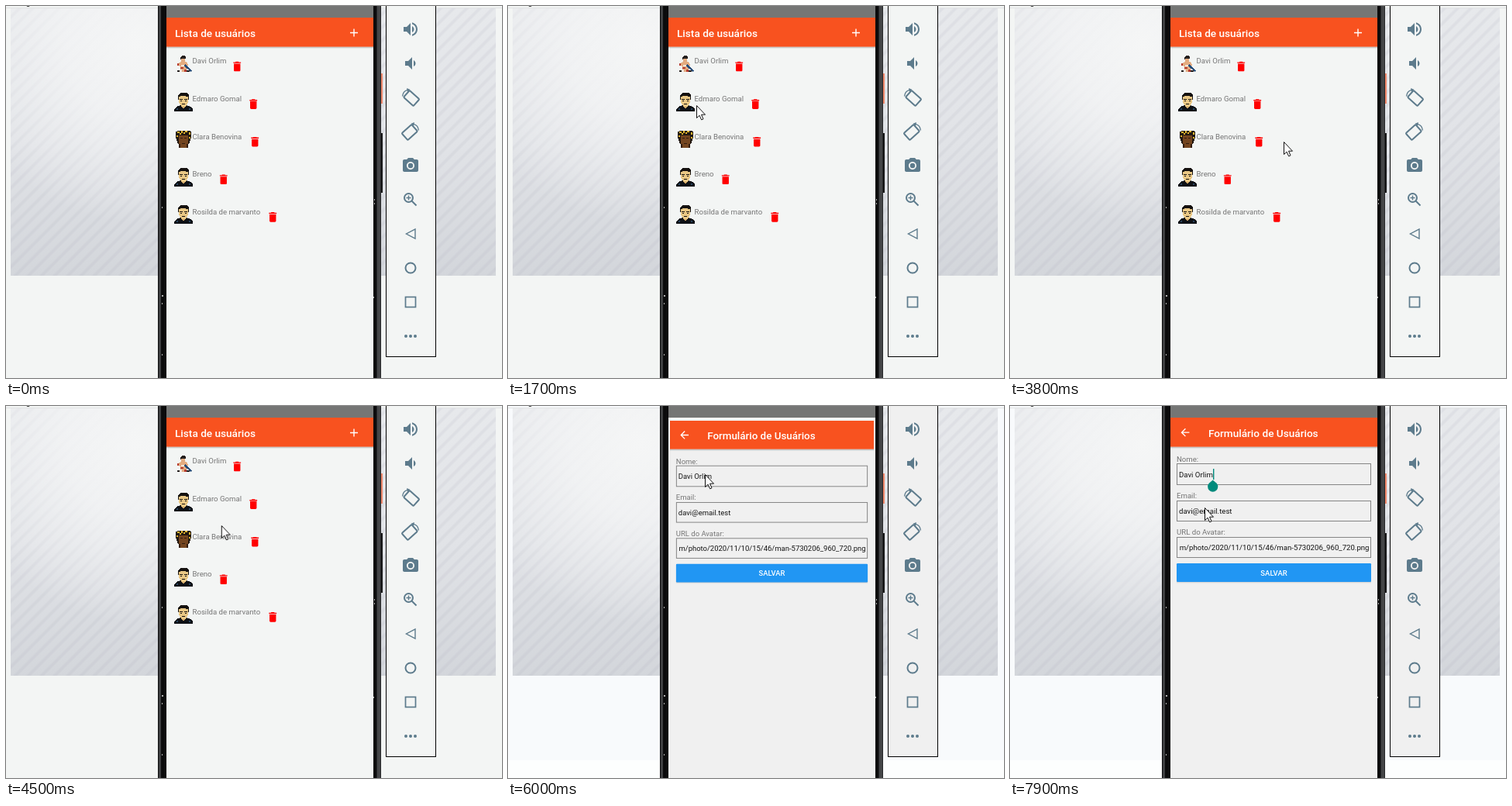
An HTML page for the animation above (8 s loop, 640 by 480 pixels).

```html
<!DOCTYPE html>
<html lang="pt-BR">
<head>
<meta charset="utf-8">
<title>Lista de usuários</title>
<style>
html, body { margin: 0; width: 100%; height: 100%; overflow: hidden; background: #f3f5f4; }
svg { display: block; }
text { font: 9.62px Roboto, sans-serif; }
.title { font-size: 13.6px; font-weight: 500; fill: #fff; }
.button { font-size: 9.5px; font-weight: 500; fill: #fff; text-anchor: middle; }
.label { fill: #757575; }
.input { fill: #141414; }
.url { text-anchor: end; }
.field { fill: none; stroke: #858585; }
.bar { fill: #f8521f; }
.icon { fill: #5d7b8c; }
.line { fill: none; stroke: #5d7b8c; stroke-width: 2; }
.thin { stroke-width: 1.4; }
.pixel { shape-rendering: crispEdges; }

.page, .foot, .tools, .list, .form, .caret, .cursor { animation: 8s step-end infinite; }
.page { animation-name: page; }
.foot { animation-name: foot; }
.tools { animation-name: tools; stroke: #000; }
.list { animation-name: list; }
.form { animation-name: form; transform-origin: 340.5px 255px; }
.caret { animation-name: caret; fill: #008a7c; }
.cursor { animation-name: cursor; }

@keyframes page { 0% { fill: #f3f5f4; } 73.75%, 100% { fill: #f8fafc; } }
@keyframes foot { 0% { fill: #f3f5f4; } 73.75%, 100% { fill: #fdfefe; } }
@keyframes tools { 0% { fill: #f3f5f4; } 73.75%, 100% { fill: #f0f0f0; } }
@keyframes list { 0% { visibility: visible; } 75%, 100% { visibility: hidden; } }
@keyframes form {
  0% { visibility: hidden; opacity: 0; transform: scale(.93); }
  73.75% { visibility: visible; opacity: .6; transform: scale(.94); }
  75% { visibility: visible; opacity: 1; transform: scale(.985); }
  77.5%, 100% { visibility: visible; opacity: 1; transform: none; }
}
@keyframes caret { 0% { visibility: hidden; } 92.5%, 100% { visibility: visible; } }

/* one step per 100 ms */
@keyframes cursor {
  0% { transform: translate(205px, -24px); animation-timing-function: steps(9); }
  11.25% { transform: translate(230px, 68px); }
  13.75% { transform: translate(230px, 68px); animation-timing-function: steps(2); }
  16.25% { transform: translate(241px, 176px); }
  17.5% { transform: translate(241px, 176px); animation-timing-function: steps(3); }
  21.25% { transform: translate(243px, 128px); animation-timing-function: steps(6); }
  28.75% { transform: translate(362px, 316px); animation-timing-function: steps(2); }
  31.25% { transform: translate(390px, 317px); }
  32.5% { transform: translate(390px, 317px); animation-timing-function: steps(4); }
  37.5% { transform: translate(410px, 270px); animation-timing-function: steps(5); }
  43.75% { transform: translate(364px, 181px); }
  45% { transform: translate(360px, 178px); }
  47.5% { transform: translate(353px, 175px); animation-timing-function: steps(8); }
  57.5% { transform: translate(267px, 151px); }
  58.75% { transform: translate(257px, 148px); }
  60% { transform: translate(257px, 148px); animation-timing-function: steps(5); }
  66.25% { transform: translate(241px, 79px); animation-timing-function: steps(2); }
  68.75% { transform: translate(239px, 75px); }
  72.5% { transform: translate(239px, 75px); animation-timing-function: steps(2); }
  75% { transform: translate(254px, 88px); }
  76.25% { transform: translate(254px, 88px); animation-timing-function: steps(5); }
  82.5% { transform: translate(236px, 92px); }
  83.75% { transform: translate(236px, 92px); animation-timing-function: steps(2); }
  86.25% { transform: translate(238px, 91px); animation-timing-function: steps(2); }
  88.75% { transform: translate(248px, 94px); }
  93.75% { transform: translate(248px, 94px); animation-timing-function: steps(4); }
  98.75%, 100% { transform: translate(251px, 131px); }
}
</style>
</head>
<body>
<svg width="640" height="480" viewBox="0 0 640 480">
  <defs>
    <linearGradient id="tone" x2="0" y2="1">
      <stop stop-color="#e7e9ec"/><stop offset=".5" stop-color="#e1e3e7"/><stop offset="1" stop-color="#d3d6db"/>
    </linearGradient>
    <radialGradient id="glow" gradientUnits="userSpaceOnUse" cx="170" cy="50" r="230">
      <stop stop-color="#f5f6f6"/><stop offset=".4" stop-color="#f3f4f5" stop-opacity=".85"/>
      <stop offset="1" stop-color="#f3f4f5" stop-opacity="0"/>
    </radialGradient>
    <pattern id="stripes" width="12" height="12" patternUnits="userSpaceOnUse" patternTransform="rotate(45)">
      <rect width="5" height="12" fill="#a9aeb8" opacity=".07"/>
      <rect x="1" width="3" height="12" fill="#a9aeb8" opacity=".07"/>
    </pattern>
    <linearGradient id="shade" x2="0" y2="1">
      <stop stop-color="#000" stop-opacity=".28"/><stop offset="1" stop-color="#000" stop-opacity="0"/>
    </linearGradient>
    <clipPath id="screen"><rect x="207" y="15" width="267" height="465"/></clipPath>
    <clipPath id="urlBox"><rect x="217" y="170" width="248" height="25"/></clipPath>

    <path id="trash" fill="red" transform="scale(.7) translate(-11.7 -12)" d="M6 19c0 1.1.9 2 2 2h8c1.1 0 2-.9 2-2V7H6v12zM19 4h-3.5l-1-1h-5l-1 1H5v2h14V4z"/>
    <g id="man" class="pixel">
      <path fill="#0e1116" d="M0 24V21L3 18 8 16H16L21 18 24 21V24Z"/>
      <path fill="#cfa566" d="M9 14H15V18L12 20 9 18Z"/>
      <path fill="#e9c784" d="M6 4H18V12L16 16 14 18H10L8 16 6 12Z"/>
      <path fill="#15110f" d="M5 9V3L8 0H16L19 3V9H18V5H16L14 4H9L7 5H6V9ZM7 8H11V9H7ZM13 8H17V9H13ZM8 10H10V11H8ZM14 10H16V11H14ZM10 14H14V15H10Z"/>
      <path fill="#27425c" d="M3 20H5V22H3ZM19 20H21V22H19Z"/>
    </g>
    <g id="fighter" class="pixel">
      <path fill="#e4ac80" d="M9 3H14V8H16L18 12 16 14V21H8V14L5 13 6 9 9 8Z"/>
      <path fill="#25201f" d="M8 5V2L10 0H14L15 2V4H9V5ZM4 19H8V21H4ZM15 19H20V21H15Z"/>
      <path fill="#f2e6dc" d="M9 12H13V14H9ZM7 18H10V21H7Z"/>
      <path fill="#b53d31" d="M8 15H12V17H8ZM13 18H16V21H13ZM4 10H6V13H4Z"/>
      <path fill="#294e79" d="M12 13 14 11 23 19 22 21Z"/>
    </g>
    <g id="braids" class="pixel">
      <path fill="#211811" d="M2 2 5 1H19L22 2V10L19 18H5L2 10Z"/>
      <path fill="#e0b32e" d="M4 2H7V4H4ZM9 1H11V4H9ZM14 1H17V3H14ZM19 3H21V6H19ZM3 7H5V9H3ZM19 9H21V11H19ZM7 4H9V6H7ZM12 3H14V5H12Z"/>
      <path fill="#74451f" d="M6 7H18V16L16 23H8L6 16Z"/>
      <path fill="#321c0e" d="M8 10H11V11H8ZM13 10H16V11H13ZM10 17H14V18H10ZM6 18H8V23H6ZM16 18H18V23H16Z"/>
    </g>
    <g id="turn">
      <rect class="line" x="-8.5" y="-5.8" width="17" height="11.6" rx="1.2" transform="translate(1.2 1) rotate(42)"/>
      <path class="line thin" d="M-10.4 -1.5Q-9.8 -8 -4 -9.6"/>
      <path class="icon" d="M-5 -12 -.6 -10.2 -4 -7Z"/>
    </g>
  </defs>

  <rect class="page" width="640" height="480"/>
  <rect class="foot" y="457" width="640" height="23"/>
  <text x="26" y="-1">g</text>
  <path d="M0 2.5H640" stroke="#e1e3e4"/>
  <g>
    <rect x="6" y="3" width="626" height="345" fill="url(#tone)"/>
    <rect x="6" y="3" width="626" height="345" fill="url(#stripes)"/>
    <rect x="6" y="3" width="626" height="345" fill="url(#glow)"/>
  </g>

  <!-- phone -->
  <rect x="196" width="288" height="480" fill="#0b0b0c"/>
  <path d="M198.5 0V480" stroke="#3f4042" stroke-width="3"/>
  <path d="M481 0V480" stroke="#454648" stroke-width="5"/>
  <rect x="484" y="87" width="2" height="39" fill="#f0876a"/>
  <rect x="484" y="164" width="2" height="77" fill="#151516"/>
  <path d="M201 260h1M201 374h2M201 384h1M201 450h1M475 250h1M475 255h1M474 376h1" stroke="#e8e8e8" stroke-width="1.5"/>
  <rect x="207" width="267" height="15" fill="#757675"/>
  <rect x="207" y="15" width="267" height="465" fill="#f3f5f4"/>

  <g class="list">
    <rect x="207" y="52.6" width="267" height="2.4" fill="url(#shade)"/>
    <rect class="bar" x="207" y="15" width="267" height="37.6"/>
    <text class="title" x="218" y="39.5">Lista de usuários</text>
    <path d="M444 34.5H454M449 29.5V39.5" stroke="#fff" stroke-width="1.4"/>
    <g class="label">
      <use href="#fighter" x="217" y="64"/><text x="240.5" y="74.3">Davi Orlim</text><use href="#trash" x="298" y="78"/>
      <use href="#man" x="217" y="112"/><text x="240.5" y="122.9">Edmaro Gomal</text><use href="#trash" x="319" y="126.6"/>
      <use href="#braids" x="217" y="160"/><text x="240.5" y="171.5">Clara Benovina</text><use href="#trash" x="321" y="175.2"/>
      <use href="#man" x="217" y="209"/><text x="240.5" y="220.1">Breno</text><use href="#trash" x="280.5" y="223.8"/>
      <use href="#man" x="217" y="257"/><text x="240.5" y="268.7">Rosilda de marvanto</text><use href="#trash" x="344" y="272.4"/>
    </g>
  </g>

  <g clip-path="url(#screen)">
    <g class="form">
      <rect x="207" y="15" width="267" height="480" fill="#f0f0f0"/>
      <rect x="207" y="52.6" width="267" height="2.4" fill="url(#shade)"/>
      <rect class="bar" x="207" y="15" width="267" height="37.6"/>
      <path fill="#fff" transform="translate(217.8 26) scale(.68)" d="M20 11H7.83l5.59-5.59L12 4l-8 8 8 8 1.41-1.41L7.83 13H20v-2z"/>
      <text class="title" x="256" y="39.8">Formulário de Usuários</text>
      <text class="label" x="215" y="72.2">Nome:</text>
      <rect class="field" x="215.5" y="74.5" width="250" height="27"/>
      <text class="input" x="218" y="91.8">Davi Orlim</text>
      <text class="label" x="215" y="119.2">Email:</text>
      <rect class="field" x="215.5" y="122.5" width="250" height="26"/>
      <text class="input" x="218" y="138.8">davi@email.test</text>
      <text class="label" x="215" y="166.2">URL do Avatar:</text>
      <rect class="field" x="215.5" y="169.5" width="250" height="26"/>
      <g clip-path="url(#urlBox)"><text class="input url" x="463.5" y="185.8">m/photo/2020/11/10/15/46/man-5730206_960_720.png</text></g>
      <rect x="215" y="225" width="251" height="4" fill="url(#shade)"/>
      <rect x="215" y="203" width="251" height="24" rx="1.3" fill="#2196f3"/>
      <text class="button" x="340.5" y="218.8">SALVAR</text>
    </g>
  </g>
  <g class="caret">
    <rect x="262" y="81" width="1.4" height="14"/>
    <path d="M261.7 95.5 266.4 99.4a6.6 6.6 0 1 1-9.4 0Z"/>
  </g>

  <!-- emulator tools -->
  <rect class="tools" x="490.5" y="-2" width="64" height="454.5"/>
  <g class="icon">
    <path transform="translate(510 18)" d="M3 9v6h4l5 5V4L7 9H3zm13.5 3c0-1.77-1.02-3.29-2.5-4.03v8.05c1.48-.73 2.5-2.25 2.5-4.02zM14 3.23v2.06c2.89.86 5 3.54 5 6.71s-2.11 5.85-5 6.71v2.06c4.01-.91 7-4.49 7-8.77s-2.99-7.86-7-8.77z"/>
    <path transform="translate(510 62)" d="M18.5 12c0-1.77-1.02-3.29-2.5-4.03v8.05c1.48-.73 2.5-2.25 2.5-4.02zM5 9v6h4l5 5V4L9 9H5z"/>
    <path transform="translate(510 194)" d="M9 2L7.17 4H4c-1.1 0-2 .9-2 2v12c0 1.1.9 2 2 2h16c1.1 0 2-.9 2-2V6c0-1.1-.9-2-2-2h-3.17L15 2H9zm3 15c-2.76 0-5-2.24-5-5s2.24-5 5-5 5 2.24 5 5-2.24 5-5 5z"/>
    <circle cx="522" cy="206" r="3.2"/>
    <circle cx="516" cy="426" r="2"/><circle cx="522" cy="426" r="2"/><circle cx="528" cy="426" r="2"/>
  </g>
  <use href="#turn" transform="translate(522 118)"/>
  <use href="#turn" transform="translate(522 162) scale(-1 1)"/>
  <g class="line">
    <circle cx="519.5" cy="247.5" r="5.5"/>
    <path d="M523.5 251.5 529.5 257.5"/>
    <path class="thin" d="M516.5 247.5H522.5M519.5 244.5V250.5"/>
    <path class="thin" d="M528 288V300L516.5 294Z"/>
    <circle cx="522" cy="338" r="6.5"/>
    <rect x="515.5" y="375.5" width="13" height="13" style="stroke-width: 1.7"/>
  </g>

  <path class="cursor" fill="#fff" stroke="#111" d="M.5 .5V16.5L4.1 13.2 6.6 18.8 9 17.8 6.5 12.2H11.5Z"/>
</svg>
</body>
</html>
```
